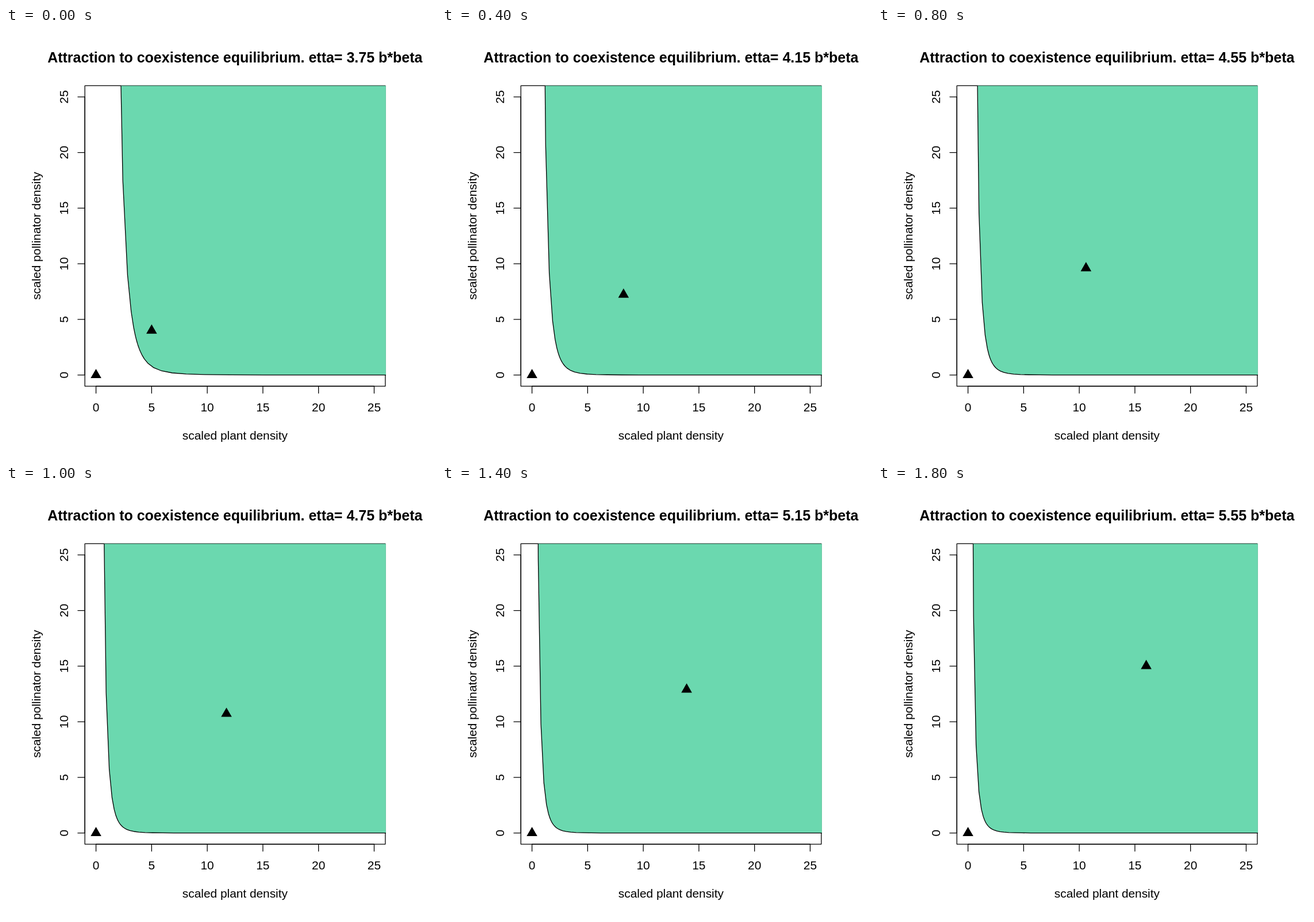
Recreate the animation shown at these times as an HTML page. Size 748x748 px, loop 2000 ms.

```html
<!DOCTYPE html>
<html lang="en">
<head>
<meta charset="utf-8">
<title>Attraction to coexistence equilibrium</title>
<style>
  html, body { margin: 0; width: 100%; height: 100%; overflow: hidden; background: #fff; }
  svg { display: block; width: 748px; height: 748px; }
  text { font: 20.85px "Liberation Sans", Arial, sans-serif; text-anchor: middle; }
  #title { font-size: 25px; font-weight: bold; }
  .line { fill: none; stroke: #000; stroke-width: 1.3; stroke-linejoin: round; stroke-linecap: round; }
  #basin { fill: #6bd8af; }
</style>
</head>
<body>
<svg viewBox="0 0 748 748">
  <clipPath id="inside"><rect x="137.2" y="100.45" width="523.6" height="523.6"/></clipPath>
  <rect class="line" x="137.2" y="100.45" width="522.6" height="522.6"/>
  <path id="axes" class="line"/>
  <g clip-path="url(#inside)">
    <path id="basin" class="line"/>
  </g>
  <path id="origin"/>
  <path id="stable"/>
  <text id="title" x="398.3" y="60"></text>
  <text x="398.4" y="716.4">scaled plant density</text>
  <text transform="translate(59.6 361.6) rotate(-90)">scaled pollinator density</text>
  <g id="numbers"></g>
</svg>
<script>
const STEP = 200, COUNT = 10;
const LEFT = 137.2, BOTTOM = 623.05, UNIT = 522.6 / 27, TICK = 12.25;
const $ = id => document.getElementById(id);
const px = x => LEFT + UNIT * (x + 1);
const py = y => BOTTOM - UNIT * (y + 1);
const point = ([x, y]) => px(x).toFixed(2) + ' ' + py(y).toFixed(2);

// Growth rates of ln(plants) and ln(pollinators)
function rates(u, v, eta) {
  const x = Math.exp(u), y = Math.exp(v), s = 1 + x + y;
  return [eta * y / s - 1 - x / 10, 10 * (2 * x / s - 1)];
}

// One Runge-Kutta step backwards in time
function back(u, v, eta, h) {
  const a = rates(u, v, eta);
  const b = rates(u - h / 2 * a[0], v - h / 2 * a[1], eta);
  const c = rates(u - h / 2 * b[0], v - h / 2 * b[1], eta);
  const d = rates(u - h * c[0], v - h * c[1], eta);
  const next = (p, i) => p - h / 6 * (a[i] + 2 * b[i] + 2 * c[i] + d[i]);
  return [next(u, 0), next(v, 1)];
}

// Follow one branch of the separatrix away from the saddle
function branch(x, y, eta) {
  const pts = [[x, y]];
  let u = Math.log(x), v = Math.log(y);
  for (let n = 0; n < 100; n++) {
    for (let k = 0; k < 20 && u < 4; k++) [u, v] = back(u, v, eta, 0.005);
    const p = [Math.exp(u), Math.exp(v)];
    pts.push(p);
    if (p[0] > 40 || p[1] > 27) break;
  }
  return pts;
}

function basin(eta, y) {
  const x = y + 1, s = x + y;
  // Linearise at the saddle to get its stable direction
  const a = -eta * x * y / (s * s) - x / 10;
  const b = eta * y / s * (1 - y / s);
  const d = -10 * y / s;
  const lambda = (a + d - Math.sqrt((a - d) ** 2 + 20 * b)) / 2;
  const slope = b / (lambda - a) * x / y;
  const dy = 0.01 / Math.hypot(1, slope), dx = slope * dy;
  const up = branch(x + dx, y + dy, eta);
  const down = branch(x - dx, y - dy, eta);
  const edge = [...up.reverse(), [x, y], ...down, [60, 0], [60, 60]];
  return 'M' + edge.map(point).join('L') + 'Z';
}

function triangle(x, y) {
  const r = 6.9, cx = px(x), cy = py(y);
  return `M${cx} ${cy - 1.555 * r}l${1.347 * r} ${2.333 * r}h${-2.694 * r}z`;
}

const scenes = Array.from({ length: COUNT }, (_, i) => {
  const eta = 3.75 + 0.2 * i, s = 5 * eta - 12, root = Math.sqrt(s * s - 44);
  const top = (s + root) / 2;
  return {
    title: `Attraction to coexistence equilibrium. etta= ${eta.toFixed(2)} b*beta`,
    basin: basin(eta, (s - root) / 2),
    stable: triangle(top + 1, top)
  };
});

let axes = `M${px(0)} ${BOTTOM}H${px(25)}M${LEFT} ${py(0)}V${py(25)}`, numbers = '';
for (let n = 0; n <= 25; n += 5) {
  axes += `M${px(n)} ${BOTTOM}v${TICK}M${LEFT} ${py(n)}h${-TICK}`;
  numbers += `<text x="${px(n)}" y="667.2">${n}</text>` +
    `<text transform="translate(108 ${py(n)}) rotate(-90)">${n}</text>`;
}
$('axes').setAttribute('d', axes);
$('numbers').innerHTML = numbers;
$('origin').setAttribute('d', triangle(0, 0));

let shown = -1;
function draw() {
  const i = Math.floor(performance.now() / STEP) % COUNT;
  if (i !== shown) {
    shown = i;
    $('title').textContent = scenes[i].title;
    $('basin').setAttribute('d', scenes[i].basin);
    $('stable').setAttribute('d', scenes[i].stable);
  }
  requestAnimationFrame(draw);
}
draw();
</script>
</body>
</html>
```
